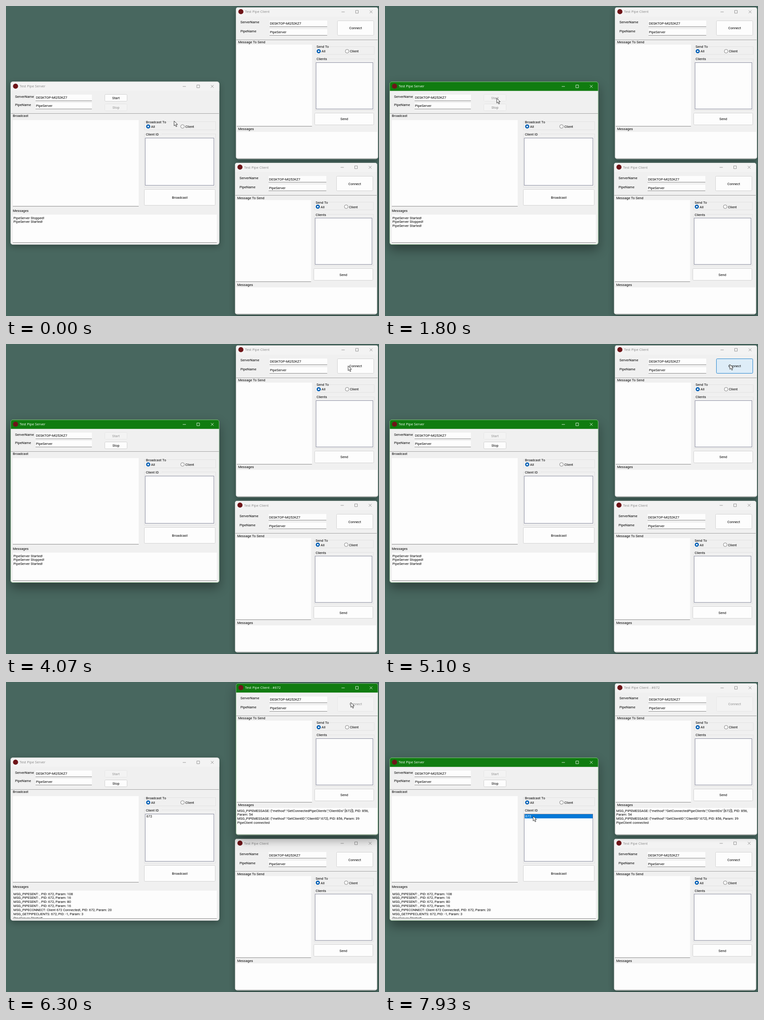
Recreate the animation shown at these times as an HTML page. Size 821x682 px, loop 8000 ms.

```html
<!DOCTYPE html>
<html lang="en">
<head>
<meta charset="utf-8">
<title>Pipe server test</title>
<style>
html, body { margin: 0; width: 100%; height: 100%; overflow: hidden; background: #48675f; }
svg { display: block; width: 821px; height: 682px; }
text { font: 7.55px Roboto, "Liberation Sans", sans-serif; fill: #000; white-space: pre; }
.title { font: 7.65px "Open Sans", "Noto Sans", sans-serif; fill: #858585; }
.glyphs { fill: none; stroke: #808080; stroke-width: .8; }
.frame { fill: none; stroke: #d6dad6; stroke-width: .8; }
.bar { fill: #f3f3f3; }
.active .bar { fill: #107c10; }
.active .title { fill: #fff; }
.active .glyphs { stroke: #fff; }
.active .frame { stroke: #8cc08c; }
.shade { opacity: .3; filter: url(#near); }
.active .shade { opacity: .38; filter: url(#far); }
.low text { transform: translateY(.5px); }
</style>
</head>
<body>
<svg id="stage" viewBox="0 0 821 682">
  <defs>
    <filter id="near" x="-20%" y="-20%" width="140%" height="140%">
      <feOffset dy="4"/><feGaussianBlur stdDeviation="7"/>
    </filter>
    <filter id="far" x="-20%" y="-20%" width="140%" height="150%">
      <feOffset dy="11"/><feGaussianBlur stdDeviation="12"/>
    </filter>
    <clipPath id="logClip"><rect x="15" y="459" width="449" height="60"/></clipPath>
  </defs>
</svg>
<script>
const stage = document.getElementById('stage');
const HOST = 'DESKTOP-MQ52KZ7';

// Markup helpers
const rect = (x, y, w, h, attrs) => `<rect x="${x}" y="${y}" width="${w}" height="${h}" ${attrs}/>`;
const text = (x, y, s, attrs = '') => `<text x="${x}" y="${y}" ${attrs}>${s}</text>`;
const line = (x1, x2, y, color) => `<path d="M${x1} ${y + .5}H${x2}" stroke="${color}"/>`;
const field = (x, y, w, h) => rect(x, y, w, h, 'fill="#fdfdfd"') + line(x, x + w, y + h - 1, '#8b8b8b');
const edit = (x, y, w, s) => field(x, y, w, 14) + text(x + 1, y + 9.2, s);
const list = (x, y, w, h) => rect(x + .5, y + .5, w, h, 'fill="#fdfdfd" stroke="#8a8da0"');
const group = (x, y, w, h) => rect(x + .5, y + .5, w, h, 'fill="none" stroke="#e2e2e2"');
const caption = (x, y, s) => rect(x - 1, y - 6, s.length * 3.9, 8, 'fill="#f0f0f0"') + text(x, y, s);

const radio = (x, y, label, on) =>
  `<circle cx="${x}" cy="${y}" r="${on ? 3.2 : 4}" fill="#fafafa" stroke="${on ? '#0560b6' : '#777'}" stroke-width="${on ? 2.7 : .9}"/>`
  + text(x + 6.3, y + 2.8, label);

const button = (x, y, w, h, label, id = '') => `<g id="${id}">`
  + rect(x + .5, y + .5, w, h, 'class="face" rx="2" fill="#fdfdfd" stroke="#d2d2d2"')
  + rect(x + .5, y + .5, w, h, 'class="glow" rx="2" fill="#deedf8" stroke="#2786cf" opacity="0"')
  + text(x + w / 2 + .5, y + h / 2 + 3.2, label, 'text-anchor="middle"') + '</g>';

function shell(id, x, y, w, h, title, body) {
  const r = x + w, b = y + h, mid = Math.round(y + 10);
  return `<g id="${id}">` + rect(x, y, w, h, 'class="shade" rx="5"')
    + rect(x, y, w, h, 'rx="5" fill="#f0f0f0"')
    + `<path class="bar" d="M${x} ${y + 20.3}V${y + 5}q0-5 5-5H${r - 5}q5 0 5 5V${y + 20.3}Z"/>`
    + `<circle cx="${x + 11}" cy="${mid - .6}" r="5.6" fill="#6e1418"/>`
    + text(x + 20, mid + 2.4, title, 'class="title"')
    + `<path class="glyphs" d="M${r - 80.5} ${mid}h7M${r - 49.5} ${mid - 3.2}h6v6h-6ZM${r - 18.5} ${mid - 3.2}l6 6m0-6l-6 6"/>`
    + body + rect(x + .4, y + .4, w - .8, h - .8, 'class="frame" rx="5"') + '</g>';
}

const server = shell('server', 10, 166.5, 459.5, 358.5, 'Test Pipe Server',
  text(20, 202, 'ServerName') + text(20, 220.3, 'PipeName')
  + edit(65, 195, 124, HOST) + edit(65, 213, 124, 'PipeServer')
  + button(217, 194, 49, 15, 'Start', 'start') + button(217, 215, 49, 15, 'Stop', 'stop')
  + line(10, 469, 236, '#a3a3a3') + text(15, 244, 'Broadcast')
  + field(15, 251, 277, 190)
  + group(304, 254, 157, 18) + caption(308, 257.7, 'Broadcast To')
  + radio(313, 265, 'All', true) + radio(388.5, 265, 'Client')
  + group(304, 281, 157, 117) + caption(308, 284.8, 'Client ID')
  + list(306, 290, 151, 104)
  + rect(307.5, 291, 149.5, 9, 'id="pick" fill="#0078d7"') + text(309, 298.3, '672', 'id="entry"')
  + button(304, 403, 156, 35, 'Broadcast')
  + text(15, 453, 'Messages') + field(15, 459, 449, 62)
  + '<g id="serverLog" clip-path="url(#logClip)"></g>');

const client = (id, host) => shell(id, 506, 3, 313, 333.5, 'Test Pipe Client',
  text(516, 38, 'ServerName') + text(516, 58, 'PipeName')
  + edit(580, 32, 127, host) + edit(580, 51, 127, 'PipeServer')
  + button(729, 32, 80, 32, 'Connect', id + 'Connect')
  + line(506, 818, 74, '#a3a3a3') + text(511, 82, 'Message To Send')
  + field(508, 85, 165.5, 180)
  + group(680, 89, 130, 17) + caption(683.5, 92.3, 'Send To')
  + radio(688.3, 99.5, 'All', true) + radio(750.8, 99.5, 'Client')
  + group(680, 116, 130, 113) + caption(683.5, 119.3, 'Clients')
  + list(682, 124, 125, 102) + button(679, 235, 130, 26, 'Send')
  + text(511, 273.3, 'Messages') + field(508, 277, 309, 59)
  + `<g id="${id}Log"></g>`);

stage.insertAdjacentHTML('beforeend',
  `<g id="upper">${client('one', HOST)}</g>`
  + `<g id="lower" class="low" transform="translate(-2 342)">${client('two', HOST)}</g>`
  + `<g id="main">${server}</g>`
  + '<path id="cursor" d="M0 0V10.6L2.4 8.4L4.3 12.6L6.1 11.8L4.3 7.7H7.6Z" fill="#fff" stroke="#222" stroke-width=".9"/>');

const $ = id => document.getElementById(id);
const ramp = (t, a, b) => Math.min(1, Math.max(0, (t - a) / (b - a)));

const started = 'PipeServer Started!', stopped = 'PipeServer Stopped!';
const serverLogs = [
  [0, [stopped, started]],
  [1690, [started, stopped, started]],
  [5400, ['MSG_PIPESENT: , PID: 672, Param: 108', 'MSG_PIPESENT: , PID: 672, Param: 16',
    'MSG_PIPESENT: , PID: 672, Param: 80', 'MSG_PIPESENT: , PID: 672, Param: 16',
    'MSG_PIPECONNECT: Client 672 Connected!, PID: 672, Param: 20',
    'MSG_GETPIPECLIENTS: 672, PID: -1, Param: 3', started]]
];
const clientLogs = [
  [0, []],
  [5400, ['MSG_PIPEMESSAGE: {"method":"GetConnectedPipeClients","ClientIDs":[672]}, PID: 856,', 'Param: 54',
    'MSG_PIPEMESSAGE: {"method":"GetClientID","ClientID":672}, PID: 856, Param: 39', 'PipeClient connected']]
];

// Cursor stops: time, x, y
const stops = [
  [0, 370, 253], [150, 370, 253], [1150, 246, 203], [1900, 246, 203], [2400, 362, 214],
  [2670, 362, 214], [2900, 372, 213], [3850, 753, 48], [4370, 753, 48], [4470, 759, 45],
  [6420, 759, 45], [7400, 333, 300], [7570, 333, 300], [7770, 326, 295], [8000, 326, 295]
];

function cursorAt(t) {
  const i = stops.findIndex(s => s[0] > t);
  const [a, x, y] = stops[i - 1], [b, u, v] = stops[i];
  const p = ramp(t, a, b), k = p * p * (3 - 2 * p);
  return [x + (u - x) * k, y + (v - y) * k];
}

function setButton(id, enabled, glow = 0) {
  const g = $(id);
  g.querySelector('.face').setAttribute('opacity', .3 + .7 * enabled);
  g.querySelector('.glow').setAttribute('opacity', glow);
  g.querySelector('text').setAttribute('opacity', .4 + .6 * enabled);
}

function setLog(id, logs, t, x, y) {
  const lines = logs.filter(log => log[0] <= t).pop()[1];
  const key = lines.join('|');
  const g = $(id);
  if (g.dataset.key === key) return;
  g.dataset.key = key;
  g.innerHTML = lines.map((s, i) => text(x, y + i * 8.85, s)).join('');
}

function draw(t) {
  const serverOn = t >= 1500 && t < 5130 || t >= 7930;
  const clientOn = t >= 5130 && t < 7930;
  const connected = t >= 5400;
  const picked = t >= 7930;

  $('server').classList.toggle('active', serverOn);
  $('one').classList.toggle('active', clientOn);
  $('one').querySelector('.title').textContent = 'Test Pipe Client' + (connected ? ' - #672' : '');

  // The upper client covers the lower one once it has been clicked.
  const [back, front] = t >= 5130 ? ['lower', 'upper'] : ['upper', 'lower'];
  if ($(back).nextElementSibling !== $(front)) $(front).before($(back));

  setButton('start', 1 - ramp(t, 1680, 1800), ramp(t, 1120, 1250) * (1 - ramp(t, 1680, 1780)));
  setButton('stop', ramp(t, 1770, 2050));
  setButton('oneConnect', 1 - ramp(t, 5400, 5600), ramp(t, 4370, 4470) * (1 - ramp(t, 5400, 5560)));

  setLog('serverLog', serverLogs, t, 16.3, 468.6);
  setLog('oneLog', clientLogs, t, 509, 285.6);

  $('entry').style.display = connected ? '' : 'none';
  $('entry').style.fill = picked ? '#fff' : '';
  $('pick').style.display = picked ? '' : 'none';
  $('cursor').setAttribute('transform', `translate(${cursorAt(t)})`);
}

function loop() {
  draw(performance.now() % 8000);
  requestAnimationFrame(loop);
}
loop();
</script>
</body>
</html>
```
